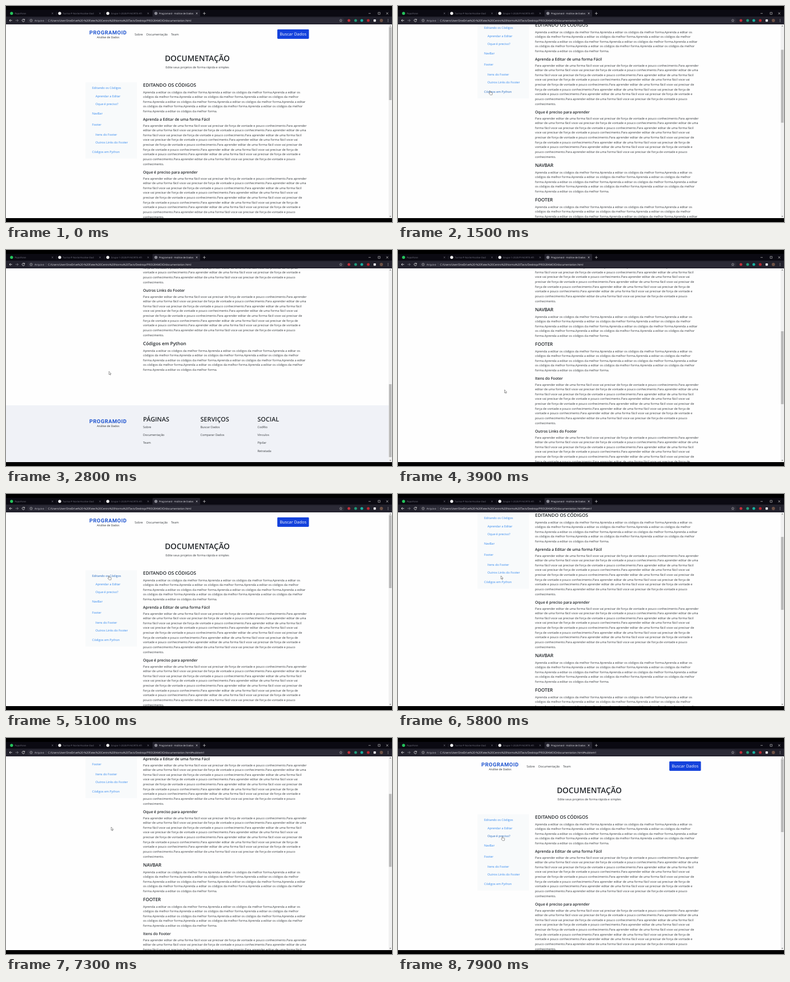
Animation of 690x388 px, one loop 8 s. Source, as an HTML page:

```html
<!DOCTYPE html>
<html lang="pt-BR">
<head>
<meta charset="utf-8">
<title>Documentação</title>
<style>
  html, body { margin: 0; width: 100%; height: 100%; overflow: hidden; background: #000; }
  svg { display: block; width: 100%; height: 100%; }
  text { font-family: "Open Sans", "Noto Sans", sans-serif; text-rendering: geometricPrecision; white-space: pre; }
</style>
</head>
<body>
<svg id="stage" viewBox="0 0 690 388"></svg>
<script>
const NS = 'http://www.w3.org/2000/svg';
const stage = document.getElementById('stage');
const LOOP = 8000, TICK = 100;
const INK = '#212529', SOFT_INK = '#34383c', LINK = '#2f86ee', LINK_HOVER = '#1a62bd';

function add(parent, tag, attrs = {}, content) {
  const node = document.createElementNS(NS, tag);
  for (const key in attrs) node.setAttribute(key, attrs[key]);
  if (content !== undefined) node.textContent = content;
  parent.appendChild(node);
  return node;
}
const rect = (parent, x, y, width, height, fill, rx = 0) =>
  add(parent, 'rect', { x, y, width, height, fill, rx });
const dot = (parent, cx, cy, r, fill) => add(parent, 'circle', { cx, cy, r, fill });
const line = (parent, d, stroke, width = 0.7) =>
  add(parent, 'path', { d, stroke, 'stroke-width': width, fill: 'none' });
const label = (parent, x, y, size, content, fill = INK, more = {}) =>
  add(parent, 'text', { x, y, 'font-size': size, fill, ...more }, content);

// ---- Page ----
const clip = add(add(stage, 'defs'), 'clipPath', { id: 'view' });
rect(clip, 0, 33, 690, 348, '#fff');
rect(stage, 0, 0, 690, 388, '#000');
rect(stage, 0, 33, 690, 348, '#fefefe');
const view = add(stage, 'g', { 'clip-path': 'url(#view)' });
const page = add(view, 'g');

function logo(y) {
  label(page, 182.5, y + 3.4, 9.5, 'PROGRAMOID', '#1d53cf', {
    'text-anchor': 'middle', 'font-weight': 700, 'letter-spacing': 0.55,
    style: 'font-family: Roboto, sans-serif' });
  label(page, 182.5, y + 10.4, 5, 'Análise de Dados', INK, { 'text-anchor': 'middle' });
}

logo(47.5);
[[230, 'Sobre'], [251, 'Documentação'], [295, 'Team']].forEach(([x, s]) => label(page, x, 52.5, 5.4, s, SOFT_INK));
rect(page, 485, 42, 56.5, 17, '#1442dc', 1.4);
label(page, 513.2, 53.2, 7.4, 'Buscar Dados', '#fff', { 'text-anchor': 'middle' });
label(page, 342, 99.2, 13.9, 'DOCUMENTAÇÃO', INK, { 'text-anchor': 'middle', 'font-weight': 600 });
label(page, 342, 112, 5.35, 'Edite seus projetos de forma rápida e simples', SOFT_INK, { 'text-anchor': 'middle' });

rect(page, 142, 137, 92, 137, '#f8fafb');
const links = [
  [154, 147, 'Editando os Códigos'], [160, 161.5, 'Aprendar a Editar'],
  [160, 176, 'Oque é preciso?'], [154, 193, 'NavBar'], [154, 213, 'Footer'],
  [160, 230.5, 'Itens do Footer'], [160, 245, 'Outros Links do Footer'],
  [154, 262, 'Códigos em Python']
].map(([x, y, s]) => ({ x, y, right: x + s.length * 2.8, node: label(page, x, y + 2, 5.45, s, LINK) }));

function wrap(content, limit) {
  const lines = [''];
  for (const word of content.split(' ')) {
    const last = lines[lines.length - 1];
    const joined = last ? last + ' ' + word : word;
    if (joined.length <= limit) lines[lines.length - 1] = joined;
    else lines.push(word);
  }
  return lines;
}
const shortText = wrap('Aprenda a editar os códigos da melhor forma.'.repeat(11), 112);
const longText = wrap(('Para aprender editar de uma forma fácil voce vai precisar de força ' +
  'de vontade e pouco conhecimento.').repeat(9), 112);

function section(y, title, main) {
  label(page, 245, y + (main ? 3.2 : 2.5), main ? 8.3 : 6.8, title, INK, { 'font-weight': 600 });
  const top = y + (main ? 14.6 : 13.6);
  (main ? shortText : longText).forEach((s, i) => label(page, 245, top + i * 8.63, 5.41, s, SOFT_INK));
}
section(142, 'EDITANDO OS CÓDIGOS', true);
section(203, 'Aprenda a Editar de uma forma Fácil');
section(298, 'Oque é preciso para aprender');
section(394, 'NAVBAR', true);
section(456, 'FOOTER', true);
section(517, 'Itens do Footer');
section(612, 'Outros Links do Footer');
section(708, 'Códigos em Python', true);

rect(page, 0, 819, 690, 104, '#f0f2f7');
logo(847.5);
[
  [245, 'PÁGINAS', ['Sobre', 'Documentação', 'Team']],
  [347.5, 'SERVIÇOS', ['Buscar Dados', 'Comparar Dados']],
  [449.5, 'SOCIAL', ['CodRio', 'Vinculos', 'Pipilar', 'Retratada']]
].forEach(([x, title, items]) => {
  label(page, x, 847.6, 11.1, title, INK, { 'font-weight': 600 });
  items.forEach((s, i) => label(page, x, 859.5 + i * 14.4, 5.4, s, SOFT_INK));
});

// ---- Scroll bar ----
rect(stage, 684, 33, 6, 348, '#f1f1f1');
const thumb = rect(stage, 684.6, 38, 4.6, 131, '#b9b9b9');
add(stage, 'path', { d: 'M685.6 36.6L687 34.8L688.4 36.6ZM685.6 377.2L687 379L688.4 377.2Z', fill: '#606060' });

// ---- Browser window ----
rect(stage, 0, 7, 690, 12, '#0b0a12');
rect(stage, 0, 19, 690, 14, '#22212c');
rect(stage, 262, 7, 85, 12.5, '#22212c', 1.5);
rect(stage, 38, 21, 567, 10, '#2b2a36', 5);
const cross = (x, y, r, color) => line(stage, `M${x - r} ${y - r}l${2 * r} ${2 * r}m0 ${-2 * r}l${-2 * r} ${2 * r}`, color);
[
  [10, 'PapoFone', '#25c45c', '#747480', 83],
  [96, 'Turma-P-Norte/Analise-Dad', '#f0f0f0', '#747480', 168],
  [182, 'Grupo-1-2020/PI-NORTE-ATI', '#f0f0f0', '#747480', 254],
  [268, 'Programoid - Análise de Dados', '#8a8a94', '#e8e8ee', 341]
].forEach(([x, title, icon, color, close]) => {
  dot(stage, x, 13.3, 2.7, icon);
  label(stage, x + 5.5, 15, 4.3, title, color);
  cross(close, 13.3, 1.3, color);
});
line(stage, 'M176 10.5v6M90 10.5v6', '#3a3946', 0.5);
line(stage, 'M352 13.3h5M354.5 10.8v5', '#ccc');
line(stage, 'M648 13.3h4M665.2 11.4h3.6v3.6h-3.6z', '#ddd', 0.6);
cross(681.5, 13.3, 1.8, '#ddd');
line(stage, 'M11 26H6m2.2-2.2L6 26l2.2 2.2', '#eee', 0.8);
line(stage, 'M17 26h5m-2.2-2.2L22 26l-2.2 2.2', '#85858f', 0.8);
line(stage, 'M32.8 24.4A2.3 2.3 0 1 0 33.3 26.4M33.2 23.2v1.8h-1.8', '#eee', 0.8);
line(stage, 'M42.7 26a2.2 2.2 0 1 0 4.4 0a2.2 2.2 0 1 0-4.4 0M44.9 25.6v1.6M44.9 24.5v.6', '#ccc', 0.6);
label(stage, 51, 27.8, 4.8, 'Arquivo', '#c4c4cc');
line(stage, 'M71.7 23.5v5', '#666672', 0.5);
const address = label(stage, 75, 27.8, 4.78, '', '#f0f0f4');
const BASE = 'C:/Users/User/OneDrive%20-%20Fatec%20Centro%20Norma%20Tavis/Desktop/PROGRAMOID/documentation.html';
line(stage, 'M598.5 23.6l.7 1.6 1.7.2-1.2 1.2.3 1.7-1.5-.8-1.5.8.3-1.7-1.2-1.2 1.7-.2z', '#ccc', 0.5);
[[613, '#c22f3a'], [625, '#1f9a78'], [636, '#18b09f'], [647.5, '#b8252f']].forEach(([x, c]) => dot(stage, x, 26, 2.5, c));
rect(stage, 657, 24, 4.2, 4.2, '#e8e8ee', 0.7);
dot(stage, 671, 26, 2.9, '#6d5145');
[24, 26, 28].forEach(y => dot(stage, 683, y, 0.55, '#ddd'));

// ---- Pointer ----
const pointer = add(stage, 'g');
const outline = { fill: '#fff', stroke: '#3c3c3c', 'stroke-width': 0.5, 'stroke-linejoin': 'round' };
const arrow = add(pointer, 'path', { d: 'M0 0V5.8L1.3 4.6L2.2 6.6L3.1 6.2L2.2 4.3H4Z', ...outline });
const hand = add(pointer, 'path', {
  d: 'M-.6.4Q0-.4.6.4V2.5L3.7 3.1Q4.3 3.3 4.2 4L3.7 7.2H.2L-2 4.5Q-1.6 3.3-.6 4.2Z', ...outline });

// ---- Motion ----
const scrollKeys = [
  [0, 0], [1000, 0], [1400, 108], [1700, 108], [2600, 540], [3300, 540],
  [3900, 287], [4600, 0], [5600, 0], [5600, 104], [6100, 104], [6400, 0],
  [6900, 0], [6900, 166], [7400, 166], [7700, 0]
];
const pointerKeys = [
  [0, 330, 357], [300, 330, 357], [1000, 180, 200], [1500, 164.5, 152.5], [1700, 166, 156],
  [2500, 184, 218], [3000, 184, 218], [3900, 190.5, 251], [4500, 190, 240],
  [5000, 184, 147], [6000, 184, 147], [6600, 188, 160], [7400, 188, 160], [7800, 186.5, 177]
];

function sample(keys, t) {
  let i = keys.length - 1;
  while (keys[i][0] > t) i--;
  const from = keys[i], to = keys[i + 1];
  if (!to) return from.slice(1);
  const u = (t - from[0]) / (to[0] - from[0]);
  return from.slice(1).map((v, k) => v + (to[k + 1] - v) * u);
}

function draw(t) {
  const [scroll] = sample(scrollKeys, t);
  const [x, y] = sample(pointerKeys, t);
  page.setAttribute('transform', `translate(0 ${-scroll})`);
  thumb.setAttribute('y', 38 + scroll * 0.376);
  address.textContent = BASE + (t < 5600 ? '' : t < 6900 ? '#item1' : '#subitem1');

  let over = false;
  for (const link of links) {
    const hit = x >= link.x && x <= link.right && Math.abs(y + scroll - link.y) < 4.4;
    link.node.setAttribute('fill', hit ? LINK_HOVER : LINK);
    over = over || hit;
  }
  pointer.setAttribute('transform', `translate(${x} ${y})`);
  pointer.setAttribute('visibility', t < 300 ? 'hidden' : 'visible');
  arrow.setAttribute('display', over ? 'none' : 'inline');
  hand.setAttribute('display', over ? 'inline' : 'none');
}

const start = performance.now();
function frame() {
  const t = (performance.now() - start) % LOOP;
  draw(Math.floor(t / TICK) * TICK);
  requestAnimationFrame(frame);
}
draw(0);
requestAnimationFrame(frame);
</script>
</body>
</html>
```
